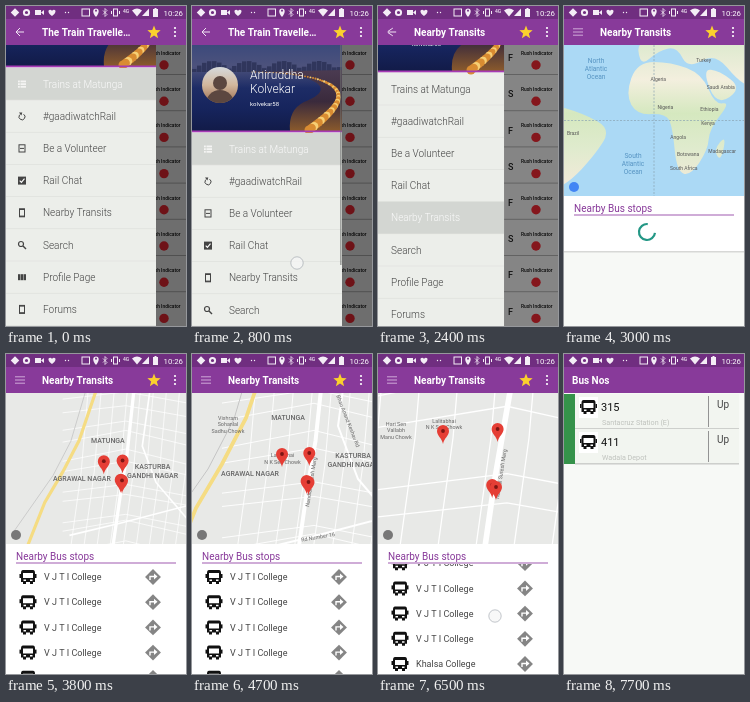
These frames come from a looping animation (180x320 px, 8000 ms). An HTML page with a canvas:

```html
<!DOCTYPE html>
<html lang="en">
<head>
<meta charset="utf-8">
<title>Transit app</title>
<style>
html, body { margin: 0; width: 100%; height: 100%; overflow: hidden; background: #fff; }
canvas { display: block; width: 180px; height: 320px; }
</style>
</head>
<body>
<canvas id="stage"></canvas>
<script>
const W = 180, H = 320, LOOP = 8000;
const PURPLE = '#883a9a', PAGE = '#f7f9f6', FONT = 'Roboto, "Noto Sans", sans-serif';
const canvas = document.getElementById('stage');
const c = canvas.getContext('2d');
const dpr = window.devicePixelRatio || 1;
canvas.width = W * dpr;
canvas.height = H * dpr;

// Eased value between a and b over the time span from..to
function tween(t, from, to, a, b) {
  const p = Math.min(1, Math.max(0, (t - from) / (to - from)));
  return a + (b - a) * p * p * (3 - 2 * p);
}
function rect(x, y, w, h, color) {
  c.fillStyle = color;
  c.fillRect(x, y, w, h);
}
function dot(x, y, r, color) {
  c.fillStyle = color;
  c.beginPath();
  c.arc(x, y, r, 0, 7);
  c.fill();
}
function arc(x, y, r, from, to, color, width) {
  c.strokeStyle = color;
  c.lineWidth = width;
  c.beginPath();
  c.arc(x, y, r, from, to);
  c.stroke();
}
function line(points, color, width = 1) {
  c.strokeStyle = color;
  c.lineWidth = width;
  c.beginPath();
  points.forEach(([x, y]) => c.lineTo(x, y));
  c.stroke();
}
function box(x, y, w, h, color, width = 1) {
  c.strokeStyle = color;
  c.lineWidth = width;
  c.strokeRect(x, y, w, h);
}
function poly(points, color) {
  c.fillStyle = color;
  c.beginPath();
  points.forEach(([x, y]) => c.lineTo(x, y));
  c.fill();
}
// Closed shape with rounded corners
function blob(points, color) {
  const n = points.length, mid = i => {
    const [a, b] = points[i % n], [d, e] = points[(i + 1) % n];
    return [(a + d) / 2, (b + e) / 2];
  };
  c.fillStyle = color;
  c.beginPath();
  c.moveTo(...mid(0));
  for (let i = 1; i <= n; i++) c.quadraticCurveTo(...points[i % n], ...mid(i));
  c.fill();
}
function svg(d, x, y, color, scale = 1) {
  at(x, y, () => {
    c.scale(scale, scale);
    c.fillStyle = color;
    c.fill(new Path2D(d), 'evenodd');
  });
}
function text(s, x, y, size, color, weight = 400, align = 'left') {
  c.font = `${weight} ${size}px ${FONT}`;
  c.fillStyle = color;
  c.textAlign = align;
  c.fillText(s, x, y + size * 0.35);
}
function lines(s, x, y, size, color, weight, gap) {
  s.split('/').forEach((part, i) => text(part, x, y + i * gap, size, color, weight, 'center'));
}
function at(x, y, draw, angle = 0) {
  c.save();
  c.translate(x, y);
  c.rotate(angle);
  draw();
  c.restore();
}
function clip(x, y, w, h, draw) {
  c.save();
  c.beginPath();
  c.rect(x, y, w, h);
  c.clip();
  draw();
  c.restore();
}
function shade(y, y2, ...colors) {
  const g = c.createLinearGradient(0, y, 0, y2);
  colors.forEach((color, i) => g.addColorStop(i / (colors.length - 1), color));
  return g;
}

function statusBar() {
  const w = '#f4edf6';
  rect(0, 0, W, 13, '#702e80');
  at(9, 6.5, () => rect(-3, -3, 6, 6, w), Math.PI / 4);
  arc(20.5, 6.5, 2.6, 0, 7, w, 2);
  rect(29, 4, 6, 5, w);
  poly([[35, 6.5], [38, 4], [38, 9]], w);
  svg('M0 4C-7-1-3-5 0-2C3-5 7-1 0 4Z', 46, 6.5, w, 0.9);
  for (const x of [59.5, 62.5]) dot(x, 6.5, 0.7, w);
  box(76, 3, 7.5, 7, w);
  svg('M0 5C-5-1-3-4.5 0-4.5S5-1 0 5ZM-1-1h2v-2h-2Z', 90, 6.5, w, 0.9);
  line([[97, 4.5], [101, 8.5], [99, 10.5], [99, 2.5], [101, 4.5], [97, 8.5]], w, 0.8);
  box(107.5, 3, 4, 7, w);
  for (const x of [105, 113]) rect(x, 5, 1, 3, w);
  text('4G', 117, 5, 5, w, 500);
  svg('M0 4L-5-2Q0-6 5-2Z', 131, 6.5, w);
  poly([[143, 10], [143, 2.5], [136, 10]], w);
  rect(147, 3, 5, 8, w);
  rect(148.5, 2, 2, 1, w);
  text('10:26', 177, 6.8, 7.8, '#fff', 400, 'right');
}

function toolbar(title, x) {
  rect(0, 13, W, 26, PURPLE);
  text(title, x, 26, 10, '#fff', 700);
}

// Menu lines turn into a back arrow as the drawer opens (k from 0 to 1)
function toolbarIcons(k) {
  const color = k > 0.5 ? '#f0e4f3' : '#cfa9d8';
  line([[9 + k, 26], [19 - k, 26]], color);
  for (const s of [-1, 1])
    line([[9 + k, 26 + s * 3.2 * (1 - k)], [19 - 5 * k, 26 + s * (3.2 + 0.8 * k)]], color);
  const star = Array.from({ length: 10 }, (_, i) => {
    const r = i % 2 ? 3 : 7, a = i * Math.PI / 5 - Math.PI / 2;
    return [148 + r * Math.cos(a), 26.5 + r * Math.sin(a)];
  });
  poly(star, '#fbd02d');
  for (const y of [22, 26, 30]) dot(169, y, 1.1, '#fff');
}

function trains(open) {
  rect(0, 39, W, 281, '#fff');
  [...'FSFSFSFF'].forEach((cls, i) => {
    const y = 47 + i * 36.2;
    text(cls, 130, y + 5, 9, '#222', 500);
    text('Rush Indicator', 174.5, y, 4.9, '#111', 500, 'right');
    rect(0, y + 21, W, 1, '#bbb');
    dot(158, y + 12, 4.7, '#ff2a35');
  });
  rect(0, 39, W, 281, `rgba(0,0,0,${0.57 * open})`);
}

const MENU = ['Trains at Matunga', '#gaadiwatchRail', 'Be a Volunteer', 'Rail Chat',
  'Nearby Transits', 'Search', 'Profile Page', 'Forums'];

const phoneIcon = color => {
  box(-2.5, -4, 5, 8, color);
  for (const y of [-4, 2.8]) rect(-2.5, y, 5, 1.2, color);
};
const ICONS = [
  color => {
    for (const y of [-3.5, -0.8, 1.9]) {
      rect(-4, y, 1.8, 1.8, color);
      rect(-1.5, y, 5.5, 1.8, color);
    }
  },
  color => {
    arc(0, 0.6, 3, -1, 4.1, color, 1);
    poly([[-3, -3.6], [0.3, -3.6], [-0.6, -0.8]], color);
  },
  color => {
    box(-3, -3.6, 6, 7.2, color);
    rect(-2, -0.5, 4, 1, color);
  },
  color => {
    rect(-4, -4, 8, 8, color);
    line([[-2.3, 0], [-0.6, 1.8], [2.5, -2]], '#fff', 1.1);
  },
  phoneIcon,
  color => {
    arc(-1, -1, 2.5, 0, 7, color, 1.2);
    line([[1, 1], [4, 4]], color, 1.4);
  },
  color => {
    for (const x of [-4, -1.2, 1.6]) rect(x, -3, 2.4, 6, color);
  },
  phoneIcon
];

function cityPhoto() {
  rect(0, 39, 150, 86, shade(39, 125, '#3c4a7c', '#4d527c', '#1d2c66', '#16245c', '#121b48'));
  for (let i = 0; i < 30; i++) {
    const h = 3 + 8 * Math.abs(Math.sin(i * 2.7));
    rect(i * 5, 66 - h, 4.5, h, '#30365c');
  }
  // Lit bay road: lights grow as they come nearer
  svg('M60 66C120 66 150 82 112 96Q96 104 98 125H150V64Z', 0, 0, shade(66, 125, '#4a3a50', '#3a2a3c', '#8a5a2c'));
  for (let i = 0; i < 60; i++) {
    const p = i / 60, x = 60 + 84 * Math.sin(p * 2.5) + 4 * p, y = 66 + 60 * p * p;
    dot(x, y, 0.6 + 4 * p * p, i % 3 ? '#d98c32' : '#f7cf74');
  }
}

function avatar() {
  c.save();
  c.beginPath();
  c.arc(28, 79, 18, 0, 7);
  c.clip();
  rect(10, 61, 36, 36, shade(61, 97, '#d6d9dc', '#d2b79d', '#9c6f52'));
  dot(28, 77, 7, '#5c4740');
  dot(28, 98, 14, '#5c4740');
  c.restore();
}

function drawer(open, scroll, selected, moving) {
  clip(0, 39, W, 281, () => at(-150 * (1 - open), 0, () => {
    rect(0, 39, 150, 281, '#eceeea');
    c.save();
    c.translate(0, -scroll);
    cityPhoto();
    avatar();
    text('Aniruddha', 58, 69, 12, '#fff', 300);
    text('Kolvekar', 58, 83, 12, '#fff', 300);
    text('kolvekar58', 58, 97.5, 6, '#fff');
    rect(0, 124.5, 150, 1.8, '#a63bb5');
    MENU.forEach((name, i) => {
      const y = 143 + i * 32.2, on = i === selected;
      if (on) rect(0, y - 16, 150, 32, '#d3d6d2');
      rect(0, y + 15.7, 150, 0.6, '#dcdeda');
      at(16, y, () => ICONS[i](on ? '#f4f4f3' : '#444'));
      text(name, 37, y, 10, on ? '#fafafa' : '#444', 300);
    });
    c.restore();
    if (moving) rect(148, 39 + scroll * 0.8, 1.6, 220, 'rgba(110,112,110,.6)');
  }));
}

// Longitude and latitude on a Mercator map centred on 0, 0
const place = ([lon, lat]) =>
  [90 + lon * 1.42, 114.5 - 81.5 * Math.log(Math.tan(Math.PI / 4 + lat * Math.PI / 360))];
const LAND = {
  africa: [[-12, 38], [12, 38], [34, 31], [43, 11], [54, 13], [39, -6], [38, -20], [26, -36], [16, -34],
    [13, -4], [8, 5], [-12, 4], [-20, 18]],
  europe: [[-10, 35], [-12, 52], [75, 52], [75, 20], [60, 26], [43, 43], [24, 34], [16, 46], [3, 44]],
  arabia: [[34, 34], [44, 10], [62, 22], [46, 33]],
  brazil: [[-75, 12], [-50, 5], [-30, -6], [-42, -24], [-60, -40], [-75, -45]],
  madagascar: [[51, -10], [47, -28], [42, -20]]
};
const COUNTRIES = {
  Turkey: [35, 39], Algeria: [3, 28], 'Saudi Arabia': [47, 23], Nigeria: [8, 9], Ethiopia: [39, 8], Kenya: [38, -2],
  Angola: [17, -12], Botswana: [24, -23], 'South Africa': [21, -32], Madagascar: [48, -21], Brazil: [-57, -9]
};

function world() {
  rect(0, 39, W, 151, '#abd9f5');
  const land = shade(40, 175, '#dfead0', '#f3efde', '#d5e8bf', '#dfebcd', '#f0ead8');
  Object.values(LAND).forEach(shape => blob(shape.map(place), land));
  c.setLineDash([2, 1.5]);
  line([[0, 114.5], [W, 114.5]], '#8aa4b2', 0.7);
  line([[90, 39], [90, 190]], '#8aa4b2', 0.7);
  c.setLineDash([]);
  lines('North/Atlantic/Ocean', 32, 55, 6.6, '#5593c2', 400, 8);
  lines('South/Atlantic/Ocean', 69, 150, 6.6, '#5593c2', 400, 8);
  for (const name in COUNTRIES) text(name, ...place(COUNTRIES[name]), 5, '#555', 400, 'center');
  dot(10, 181, 5, '#4285f4');
}

function cityMap(zoom) {
  const px = x => 115 + (x - 115) * zoom, py = y => 136 + (y - 136) * zoom;
  const road = (pts, width, color = '#fff') =>
    line(pts.map(([x, y]) => [px(x), py(y)]), color, width * Math.sqrt(zoom));
  const area = (s, x, y) => {
    if (zoom < 1.6) lines(s, px(x), py(y), 7, '#666', 500, 9);
  };
  const label = (s, x, y, angle = 0) => {
    if (zoom > 0.8) at(px(x), py(y), () => lines(s, 0, 0, 5.4, '#666', 400, 6.6), angle);
  };
  const pin = (x, y) => {
    svg('M0 0C-1-6-6-8-6-13A6 6 0 0 1 6-13C6-8 1-6 0 0Z', px(x), py(y), '#e53e35');
    dot(px(x), py(y) - 13, 1.9, '#7c1613');
  };

  rect(0, 39, W, 151, '#e8e9e7');
  for (let i = 0; i < 13; i++) {
    const y = -30 + i * 22 + 5 * Math.sin(i * 3), x = 57 + i * 19;
    road([[30, y + 11], [122, y - 3 + 4 * Math.sin(i)], [230, y + 20]], 0.9);
    road([[x + 12, -30], [x, 110], [x - 18, 240]], 0.9);
  }
  road([[160, -30], [146, 72], [166, 125], [230, 200]], 2);
  road([[40, 202], [115, 184], [230, 154]], 2);
  road([[136, -30], [123.5, 87], [116, 130], [100, 240]], 4);
  road([[86, -30], [54, 64], [30, 110], [4, 154], [-30, 240]], 3.8, '#f5dc83');
  road([[70, -30], [42, 65], [16, 115], [-40, 195]], 1, '#c5c5c5');

  area('MATUNGA', 96, 64);
  area('KASTURBA/GANDHI NAGAR', 161, 102);
  area('AGRAWAL NAGAR', 58, 120);
  label('Vishram/Sohanlal/Sadhu Chowk', 36, 64);
  label('Lalitabhai/N K Sen Chowk', 90.5, 101.5);
  if (zoom > 1.5) label('Hari Sen/Vallabh/Manu Chowk', 66.5, 103);
  label('Bhau Anand Keshav Rd', 156, 67, 1.2);
  label('Nandlal Suresh Marg', 119, 128, -1.42);
  label('Rd Number 16', 126, 183, -0.17);
  pin(117.3, 112);
  pin(90, 113);
  pin(114.6, 140);
  pin(116.5, 141);
  dot(10, 181, 5, '#777');
}

function bus(x, y) {
  svg('M-5-7H5Q7-7 7-4V5H5V7H2V5H-2V7H-5V5H-7V-4Q-7-7-5-7ZM-5-4V1H5V-4ZM-4.5 2.5V4H-2V2.5ZM2 2.5V4H4.5V2.5Z', x, y, '#111');
  for (const side of [-8.5, 7]) rect(x + side, y - 3, 1.5, 4, '#111');
}

function stops(scroll) {
  clip(0, 210, W, 110, () => {
    for (let i = 0; i < 8; i++) {
      const y = 223 + i * 25.2 - scroll;
      bus(22, y);
      text(i < 5 ? 'V J T I College' : 'Khalsa College', 38, y, 9, '#444');
      at(147, y, () => rect(-5.6, -5.6, 11.2, 11.2, '#858585'), Math.PI / 4);
      line([[144, y + 3], [144, y - 0.5], [149, y - 0.5]], '#fff', 1.4);
      poly([[148, y - 3.5], [151.5, y - 0.5], [148, y + 2.5]], '#fff');
    }
  });
}

function nearby(t) {
  const loaded = t >= 3500;
  rect(0, 39, W, 281, loaded ? '#fff' : PAGE);
  clip(0, 39, W, 151, () => {
    if (!loaded) world();
    else cityMap(tween(t, 3500, 4500, 0.6, 1) + tween(t, 4900, 5600, 0, 1));
  });
  if (loaded) stops(tween(t, 5700, 6500, 0, 39) + tween(t, 6600, 7000, 0, 7));
  else {
    rect(0, 245, W, 2.5, shade(245, 247.5, '#cfd0ce', PAGE));
    rect(0, 190, W, 55, '#fff');
    const a = (t - 3000) / 190;
    arc(83, 226, 8, a + 0.1, a + 4.8, '#239785', 2.2);
  }
  text('Nearby Bus stops', 10, 202, 10, PURPLE);
  rect(10, 208.5, 160, 1, '#a05bb0');
}

function busRow(y, number, goal) {
  rect(0, y, 11, 35, '#35924a');
  rect(11, y, 164, 35, '#f2f5f0');
  rect(11, y + 34.5, 164, 0.8, '#aaa');
  rect(15, y + 3, 19, 21, '#fff');
  bus(24.5, y + 13);
  text(number, 37, y + 13.5, 11, '#111');
  text(goal, 38, y + 28, 7.2, '#bfc2bd');
  rect(144, y + 2, 0.9, 31, '#888');
  text('Up', 153, y + 10, 10, '#444');
}

function busNumbers(loaded) {
  rect(0, 39, W, 281, PAGE);
  if (loaded) {
    busRow(40, '315', 'Santacruz Station (E)');
    busRow(75, '411', 'Wadala Depot');
  }
  toolbar('Bus Nos', 8);
}

function touch(x, y) {
  dot(x, y, 6.2, 'rgba(245,245,245,.75)');
  arc(x, y, 6.2, 0, 7, 'rgba(120,130,140,.55)', 0.8);
}

function draw(t) {
  const during = (from, to) => t >= from && t < to;
  c.setTransform(dpr, 0, 0, dpr, 0, 0);
  const open = tween(t, 2320, 2640, 1, 0), chosen = t >= 2100;
  const scroll = 65 - tween(t, 100, 700, 0, 65) + tween(t, 1000, 1700, 0, 60);
  if (open > 0) {
    trains(open);
    drawer(open, scroll, chosen ? 4 : 0, during(100, 1900));
  } else nearby(t);
  toolbar(chosen ? 'Nearby Transits' : 'The Train Travelle…', 36);
  toolbarIcons(open);

  if (during(100, 1600)) touch(105, 185 + tween(t, 100, 800, 0, 72) - tween(t, 1000, 1600, 0, 60));
  if (during(2000, 2150)) touch(92, 212);
  if (during(5700, 6700)) touch(117, tween(t, 5700, 6500, 301, 262));
  if (during(7100, 7250)) touch(100, 278);

  if (t >= 7300) {
    c.save();
    c.globalAlpha = tween(t, 7300, 7500, 0, 1);
    c.translate(0, tween(t, 7300, 7550, 26, 0));
    busNumbers(t >= 7600);
    c.restore();
  }
  statusBar();
}

const start = performance.now();
function tick() {
  draw((performance.now() - start) % LOOP);
  requestAnimationFrame(tick);
}
tick();
</script>
</body>
</html>
```
